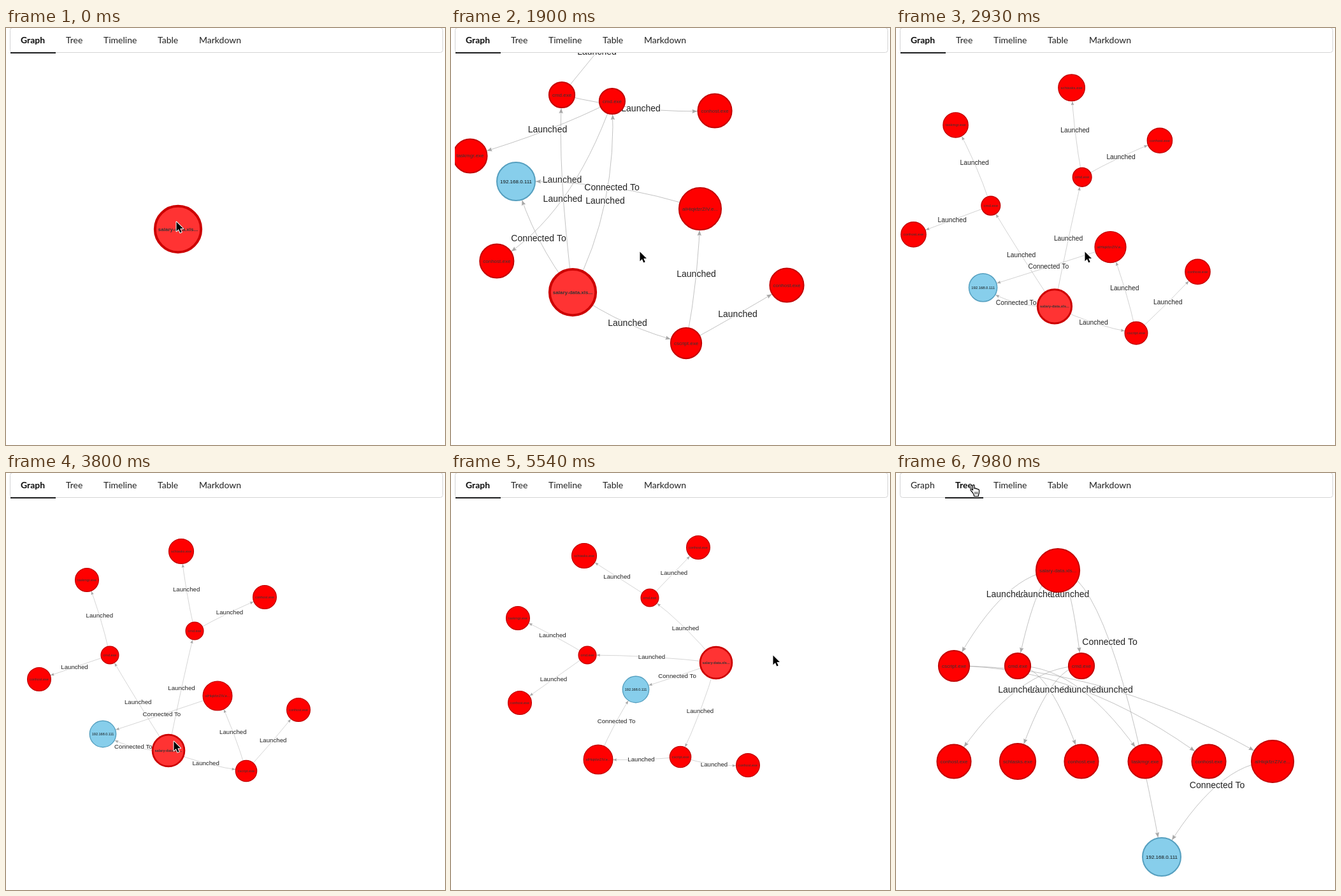
An HTML page with a canvas that plays this animation: 689x655 px, repeating every 8 s.

```html
<!DOCTYPE html>
<html lang="en">
<head>
<meta charset="utf-8">
<title>Process graph</title>
<style>
  html, body { margin: 0; width: 100%; height: 100%; overflow: hidden; background: #fff; }
  canvas { display: block; }
</style>
</head>
<body>
<canvas id="stage" width="689" height="655"></canvas>
<script>
const ctx = document.getElementById('stage').getContext('2d');
const LOOP = 8000, EXPAND = 1080, TREE = 7800;
const SANS = '"Liberation Sans", Arial, sans-serif';
const UI = 'Lato, "Open Sans", sans-serif';
const RED = ['#ff0000', '#c40000'], PICKED = ['#ff3333', '#cc0000'], BLUE = ['#87ceeb', '#559fbf'];

const names = ['salary-data.xls...', 'cscript.exe', 'cmd.exe', 'cmd.exe', '192.168.0.111',
  'conhost.exe', 'alHiqkfzrZIV.e...', 'taskmgr.exe', 'conhost.exe', 'schtasks.exe', 'conhost.exe'];
const IP = 4;
const edges = [[0, 1], [0, 2], [0, 3], [0, 4], [1, 6], [1, 5], [2, 7], [3, 10], [2, 8], [3, 9], [6, 4]];

// A pose holds node centres followed by the label offset of each edge.
function pose(points, bends = {}, k = 1) {
  const offsets = edges.flatMap((_, i) => (bends[i] || [0, 0]).map(v => v * k));
  return [...points.flat(), ...offsets];
}

const burst = [[191, 415], [369, 495], [253, 115], [174, 105], [102, 241], [527, 404],
  [391, 284], [30, 201], [72, 366], [284, -30], [414, 130]];
const settled = [[255, 436], [377, 468], [163, 286], [296, 248], [152, 410], [459, 372],
  [332, 350], [127, 168], [52, 324], [275, 123], [406, 195]];
const seed = burst.map(([x, y]) => [270 + (x - 191) * .4, 316 + (y - 415) * .4]);
const bendOut = { 0: [-4, 7], 1: [-3, -2], 2: [0, -7], 3: [-6, 12], 4: [3, -4], 5: [2, 0],
  6: [3, -5], 7: [0, -4], 9: [-4, -4], 10: [4, -1] };
const bendEnd = { 0: [3, 2], 1: [0, -3], 2: [4, -3], 3: [2, 0], 4: [3, 2], 5: [0, 5], 6: [0, -2], 10: [-1, -5] };
const rest = pose(settled, bendOut, .6);

const layout = [
  [EXPAND, ...pose(seed)],
  [1900, ...pose(burst, { 0: [-3, 9], 1: [20, 7], 2: [-8, -21], 3: [-9, 3], 4: [5, -3], 5: [2, 0],
    6: [10, 2], 7: [4, 9], 8: [13, 28], 10: [6, -12] })],
  [2470, ...pose([[227, 440], [377, 502], [120, 248], [274, 185], [104, 396], [511, 405],
    [354, 322], [26, 121], [-22, 326], [278, 14], [430, 136]], bendOut)],
  [3220, ...rest],
  [4160, ...rest],
  [4620, ...pose([[396, 288], [357, 474], [168, 288], [300, 208], [211, 421], [462, 384],
    [340, 345], [127, 170], [54, 333], [265, 107], [417, 185]],
    { 0: [-13, 2], 1: [-10, 2], 2: [-13, 7], 3: [-14, 0], 4: [6, 4], 5: [3, 1],
      6: [-2, -2], 7: [1, 2], 8: [-2, -2], 9: [-2, 1], 10: [0, 8] })],
  [5540, ...pose([[416, 298], [360, 446], [214, 286], [312, 196], [290, 340], [466, 459],
    [231, 450], [105, 228], [108, 361], [209, 130], [388, 117]], bendEnd)],
  [6280, ...pose([[418, 300], [366, 450], [216, 288], [313, 197], [294, 340], [458, 492],
    [232, 468], [97, 225], [110, 370], [205, 132], [386, 117]], bendEnd)]
];
const zooms = [[0, 1], [2300, 1], [2470, .92], [3200, .69]];
const pointer = [[0, 267, 304], [600, 267, 304], [780, 296, 351], [3580, 296, 351], [3800, 263, 421],
  [3920, 261, 428], [4160, 261, 428], [4620, 423, 275], [4900, 512, 287], [5500, 505, 286],
  [7120, 505, 286], [7700, 121.5, 18], [7979, 121.5, 18], [7980, 121.5, 19]];

const leaf = k => [91 + 100 * k, 453];
const treePoints = [[254, 153], [91, 303], [191, 303], [291, 303], [417, 603],
  leaf(4), leaf(5), leaf(3), leaf(2), leaf(1), leaf(0)];
const treePose = pose(treePoints, edges.map(([a, b]) => [0, (treePoints[a][1] - treePoints[b][1]) / 4]));

// Monotone cubic track: smooth between keys, never overshooting them.
function sample(keys, t) {
  const last = keys.length - 1;
  if (t <= keys[0][0]) return keys[0].slice(1);
  if (t >= keys[last][0]) return keys[last].slice(1);
  let i = 0;
  while (t >= keys[i + 1][0]) i++;
  const span = keys[i + 1][0] - keys[i][0], u = (t - keys[i][0]) / span;
  const slope = (j, c) => (keys[j + 1][c] - keys[j][c]) / (keys[j + 1][0] - keys[j][0]);
  const tangent = (j, c) => {
    if (j === 0) return 2 * slope(0, c);
    if (j === last) return 0;
    const p = slope(j - 1, c), q = slope(j, c);
    return p * q > 0 ? 2 * p * q / (p + q) : 0;
  };
  const h = u * u * (3 - 2 * u);
  return keys[i].slice(1).map((a, n) => {
    const c = n + 1;
    return a + (keys[i + 1][c] - a) * h
      + span * u * (1 - u) * ((1 - u) * tangent(i, c) - u * tangent(i + 1, c));
  });
}

function text(str, x, y, font, color, align = 'center') {
  ctx.font = font;
  ctx.textAlign = align;
  ctx.textBaseline = 'middle';
  ctx.fillStyle = color;
  ctx.fillText(str, x, y);
}

const nodeFont = picked => `${picked ? 'bold ' : ''}8px ${SANS}`;

function radius(i, picked) {
  ctx.font = nodeFont(picked);
  return ctx.measureText(names[i]).width / 2 + 5;
}

function drawNode(i, [x, y], zoom, picked) {
  const [fill, line] = i === IP ? BLUE : picked ? PICKED : RED;
  const r = radius(i, picked);
  ctx.save();
  ctx.translate(x, y);
  ctx.scale(zoom, zoom);
  ctx.beginPath();
  ctx.arc(0, 0, r, 0, 7);
  ctx.fillStyle = fill;
  ctx.fill();
  ctx.strokeStyle = line;
  ctx.lineWidth = picked ? 4 : 2;
  ctx.stroke();
  text(names[i], 0, .3, nodeFont(picked), i === IP ? '#111' : '#343434');
  ctx.restore();
}

function drawEdge([from, to], a, b, [dx, dy], zoom) {
  const mx = (a[0] + b[0]) / 2, my = (a[1] + b[1]) / 2;
  const via = [mx + 2 * dx, my + 2 * dy];
  const at = u => [0, 1].map(k => (1 - u) ** 2 * a[k] + 2 * u * (1 - u) * via[k] + u * u * b[k]);

  ctx.beginPath();
  ctx.moveTo(...a);
  ctx.quadraticCurveTo(...via, ...b);
  ctx.strokeStyle = '#a8a8a8';
  ctx.lineWidth = .7 * zoom;
  ctx.stroke();

  const reach = (radius(to, false) + 1) * zoom;
  let lo = .3, hi = 1;
  for (let n = 0; n < 16; n++) {
    const mid = (lo + hi) / 2, p = at(mid);
    if (Math.hypot(p[0] - b[0], p[1] - b[1]) > reach) lo = mid; else hi = mid;
  }
  const tip = at(lo), back = at(lo - .02);
  ctx.save();
  ctx.translate(...tip);
  ctx.rotate(Math.atan2(tip[1] - back[1], tip[0] - back[0]));
  ctx.scale(zoom, zoom);
  ctx.beginPath();
  ctx.moveTo(0, 0);
  ctx.lineTo(-8, 3.2);
  ctx.lineTo(-7, 0);
  ctx.lineTo(-8, -3.2);
  ctx.fillStyle = '#a8a8a8';
  ctx.fill();
  ctx.restore();

  ctx.save();
  ctx.translate(mx + dx, my + dy);
  ctx.scale(zoom, zoom);
  const label = to === IP ? 'Connected To' : 'Launched', font = `14px ${SANS}`;
  ctx.font = font;
  ctx.textAlign = 'center';
  ctx.textBaseline = 'middle';
  ctx.lineJoin = 'round';
  ctx.lineWidth = 2;
  ctx.strokeStyle = '#fff';
  ctx.strokeText(label, 0, .5);
  text(label, 0, .5, font, '#222');
  ctx.restore();
}

function drawGraph(t) {
  ctx.save();
  ctx.beginPath();
  ctx.rect(6, 39, 680, 616);
  ctx.clip();
  if (t < EXPAND) {
    drawNode(0, [270, 316], 1, true);
  } else {
    const tree = t >= TREE;
    const p = tree ? treePose : sample(layout, t);
    const zoom = tree ? 1 : sample(zooms, t)[0];
    const pair = k => [p[2 * k], p[2 * k + 1]];
    edges.forEach((e, i) => drawEdge(e, pair(e[0]), pair(e[1]), pair(names.length + i), zoom));
    names.forEach((_, i) => drawNode(i, pair(i), zoom, i === 0 && !tree));
  }
  ctx.restore();
}

const tabs = [['Graph', 23], ['Tree', 94], ['Timeline', 153], ['Table', 238], ['Markdown', 303]];

function drawTabs(active) {
  ctx.beginPath();
  ctx.roundRect(6.5, -.5, 679, 39, 4);
  ctx.strokeStyle = '#d4d4d5';
  ctx.lineWidth = 1;
  ctx.stroke();
  tabs.forEach(([name, x], i) => {
    const on = i === active;
    text(name, on && i ? x - 1 : x, 19.5, `${on ? 700 : 400} 14px ${UI}`, on ? '#0d0d0d' : '#212121', 'left');
  });
  ctx.fillStyle = '#1b1c1d';
  if (active) ctx.fillRect(77, 38, 60, 2);
  else ctx.fillRect(7, 38, 71, 2);
}

const arrow = new Path2D('M.5 .5V15.2L3.9 12L6.3 17.6L8.7 16.6L6.3 11.1H11Z');
const hand = new Path2D('M4 13L1 9.5Q-.2 7.6 1.5 7.2Q2.6 7 4 9V2Q4 .6 5.3 .6Q6.6 .6 6.6 2V6.5' +
  'Q7.2 5.6 8.2 5.9Q9.1 6.1 9.2 7Q10 6.3 10.9 6.7Q11.7 7 11.8 7.8Q13.8 7 14 9.2V12' +
  'Q14 14.5 12.8 16.5V18.5H6V17Z');
const knuckles = new Path2D('M7.3 11.5V15.5M9.3 11.5V15.5M11.3 11.5V15.5');

function drawPointer(t) {
  const [x, y] = sample(pointer, t);
  ctx.save();
  ctx.lineJoin = 'round';
  if (y < 38) {
    ctx.translate(x - 5, y - 1);
    ctx.fillStyle = '#fff';
    ctx.fill(hand);
    ctx.strokeStyle = '#000';
    ctx.lineWidth = 1.2;
    ctx.stroke(hand);
    ctx.lineWidth = .8;
    ctx.stroke(knuckles);
  } else {
    ctx.translate(x, y);
    ctx.strokeStyle = '#fff';
    ctx.lineWidth = 2;
    ctx.stroke(arrow);
    ctx.fillStyle = '#000';
    ctx.fill(arrow);
  }
  ctx.restore();
}

function frame() {
  const t = performance.now() % LOOP;
  ctx.fillStyle = '#fff';
  ctx.fillRect(0, 0, 689, 655);
  drawGraph(t);
  drawTabs(t >= TREE ? 1 : 0);
  drawPointer(t);
  requestAnimationFrame(frame);
}
frame();
</script>
</body>
</html>
```
